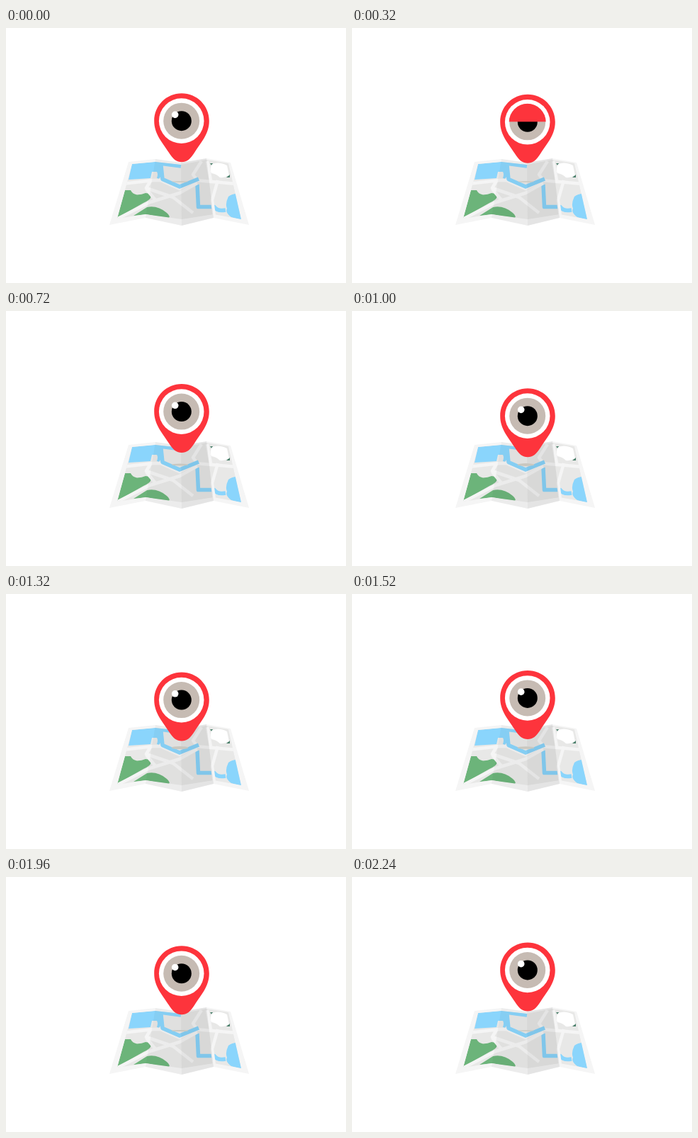
An HTML page that plays this animation: 480 by 360 pixels, repeating every 2.28 s.

```html
<!DOCTYPE html>
<html lang="en">
<head>
<meta charset="utf-8">
<title>Map pin</title>
<style>
  html, body { margin: 0; width: 100%; height: 100%; overflow: hidden; background: #fff; }
  svg { display: block; width: 100vw; height: 100vh; }
  .road { fill: none; stroke: #f5f5f5; stroke-width: 4.5; stroke-linejoin: round; }
  .river { fill: none; stroke: #8ad5fc; stroke-width: 5.5; stroke-linejoin: round; }
  .water { fill: #8ad5fc; }
  .park { fill: #6cb47a; }
</style>
</head>
<body>
<svg viewBox="0 0 480 360">
  <defs>
    <clipPath id="land">
      <path d="M178 192 211 189 247 193 283 186 314 191 332 270 293 263 248 270 197 263 157 269Z"/>
    </clipPath>
    <clipPath id="iris"><circle cx="247.7" cy="131.5" r="26"/></clipPath>
  </defs>

  <!-- paper -->
  <path fill="#f5f5f5" d="M173 189 211 185 247 190 283 184 317 190 343 278 293 268 248 279 197 268 146 278Z"/>

  <g clip-path="url(#land)">
    <path fill="#e8e8e7" d="M140 180H350V285H140Z"/>

    <path class="water" d="M178 192 209 189 217 192Q221 197 220 207L216 213 213 212Q215 206 213 203L206 203 204 212 173 214Z"/>
    <path class="river" d="M209 190 247 195"/>
    <path class="river" d="M270 221 271.500 252.500 294 252.500Q298 259 310 257"/>
    <path class="water" d="M314 238Q319 234 326 234L333 271 318 267Q309 260 312 255 309 248 314 238Z"/>
    <path class="park" d="M168 229H176Q178 234 185 235.500 192 235 197 233 205 233 204.500 239 203 243 194 247L157 268Z"/>
    <path class="park" d="M180 265 199 253Q214 250 227 261 233 266 229 269L198 263Z"/>

    <path class="road" d="M164 220 208 215 218 215 245 227 268 215 325 220"/>
    <path class="road" d="M205 214 198 226 236 239 264 261"/>
    <path class="road" d="M154 271 203 246 245 233 270 219"/>
    <path class="road" d="M198 227 211 243"/>
    <path class="road" d="M276 188 264 207 270 215"/>
    <path class="road" d="M284 188 289 215M299 215 291 243 294 266"/>
    <path class="river" d="M219 194 221 213.500 245 224 272 213"/>
  </g>

  <!-- fold shading -->
  <path opacity=".035" d="M211 185 247 190 248 279 197 268Z"/>
  <path opacity=".07" d="M247 190 283 184 293 268 248 279Z"/>

  <path fill="#477d68" d="M288 191H292L291 195ZM311 211 316 207V211Z"/>
  <path fill="#fff" d="M291 192Q301 188 312 194L315 208Q309 212 302 211 297 206 290 205 287 198 291 192Z"/>
  <ellipse id="shadow" cx="245.5" cy="217" rx="12" ry=".7" fill="#c9c7bf"/>

  <g id="pin">
    <path fill="#fd343c" d="M248 92.5C226.500 92.500 209.200 109.800 209.200 131.500 209.200 150 221 162 229.500 175.500 236 186 241 189.500 248 189.500 255 189.500 260 186 266.500 175.500 275 162 286.800 150 286.800 131.500 286.800 109.800 269.500 92.500 248 92.500Z"/>
    <circle cx="247.7" cy="131.5" r="31.8" fill="#fff"/>
    <circle cx="247.7" cy="131.5" r="25.5" fill="#c6bbb3"/>
    <circle cx="247.8" cy="131.5" r="14" fill="#000"/>
    <circle cx="238.7" cy="122.7" r="4.8" fill="#fff"/>
    <g clip-path="url(#iris)">
      <rect id="lid" x="220" y="105" width="56" height="0" fill="#fd343c"/>
    </g>
  </g>
</svg>
<script>
  const LOOP = 2280, STEP = 40, TOP = -0.6, TRAVEL = 19, LID = 26;
  const pin = document.getElementById('pin');
  const lid = document.getElementById('lid');
  const shadow = document.getElementById('shadow');

  const smooth = (from, to, t) => {
    const p = Math.min(1, Math.max(0, (t - from) / (to - from)));
    return p * p * (3 - 2 * p);
  };

  function render(t) {
    const drop = (1 - Math.cos(2 * Math.PI * (t - 85) / LOOP)) / 2;
    const blink = smooth(160, 290, t) - smooth(370, 500, t);
    pin.setAttribute('transform', `translate(0 ${(TOP + drop * TRAVEL).toFixed(2)})`);
    lid.setAttribute('height', (blink * LID).toFixed(2));
    shadow.setAttribute('ry', (0.7 + drop * 1.3).toFixed(2));
  }

  const start = performance.now();
  function tick() {
    const t = (performance.now() - start) % LOOP;
    render(Math.floor(t / STEP) * STEP);
    requestAnimationFrame(tick);
  }
  render(0);
  requestAnimationFrame(tick);
</script>
</body>
</html>
```
